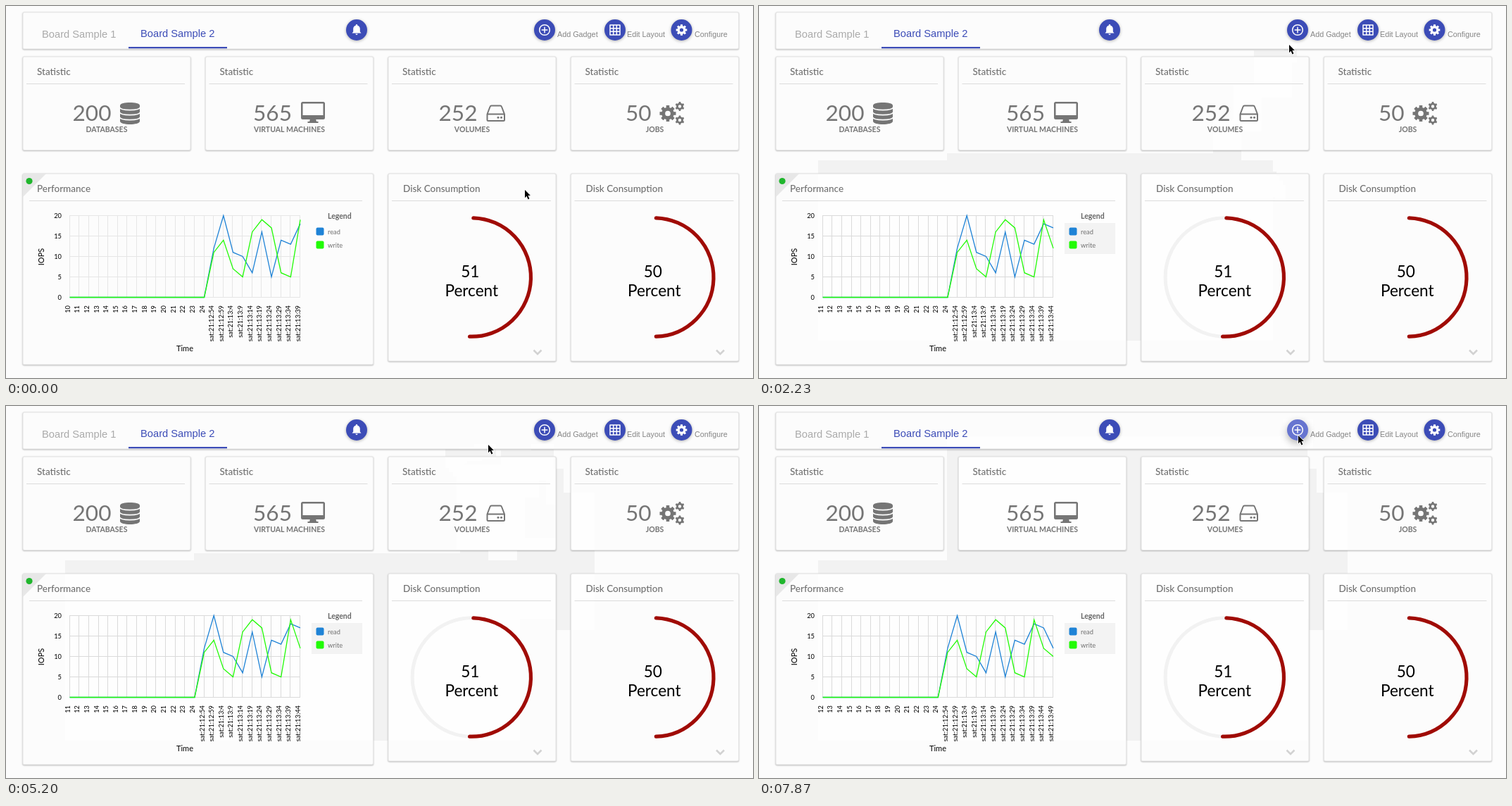
These frames come from a looping animation (1061 px wide and 528 px high, 8 s). An HTML page with a canvas:

```html
<!DOCTYPE html>
<html>
<head>
<meta charset="utf-8">
<style>
html, body { margin: 0; width: 100%; height: 100%; overflow: hidden; background: #fcfcfc; }
canvas { display: block; }
</style>
</head>
<body>
<canvas id="stage" width="1061" height="528"></canvas>
<script>
const ctx = document.getElementById('stage').getContext('2d');
const LOOP = 8000, TICK = 148.3;
const GREY = '#757575', INDIGO = '#3c4cb7', LATO = 'Lato, sans-serif', SANS = '"Liberation Sans", Arial, sans-serif';
const read = [12, 20, 11, 10, 6, 16, 5, 14, 13, 18, 17, 12];
const write = [11, 14, 7, 5, 16, 19, 17, 6, 5, 19, 12, 10];

// The chart shifts by one sample at each update
const updates = [{ tick: 6, start: 980 }, { tick: 41, start: 5940 }];
const HAND_FROM = 40, HAND_TO = 51;

// Pointer key points (tick, x, y), joined by straight moves
const keys = [
  [0, 737, 260], [4, 719, 235], [5, 719, 235], [6, 650, 219], [10, 645, 209], [12, 703, 113], [13, 703, 113],
  [14, 746, 63], [15, 753, 54], [17, 753, 54], [19, 781, 123], [20, 825, 301], [22, 810, 285], [23, 726, 187],
  [25, 726, 187], [26, 640, 83], [29, 624, 65], [32, 624, 65], [39, 766, 40], [40, 768, 46], [41, 768, 46],
  [42, 768, 43], [50, 768, 43], [51, 766, 41], [54, 766, 41]
];

function pointerAt(tick) {
  const i = Math.max(1, keys.findIndex(key => key[0] >= tick));
  const [t0, x0, y0] = keys[i - 1], [t1, x1, y1] = keys[i];
  const p = (tick - t0) / (t1 - t0);
  return [Math.round(x0 + (x1 - x0) * p), Math.round(y0 + (y1 - y0) * p)];
}

// The area repainted at a tick encloses everything that changed: left, top, right, bottom
function repaintAt(tick) {
  const boxes = [];
  const from = pointerAt(tick - 1), to = pointerAt(tick);
  if (String(from) !== String(to))
    for (const [x, y] of [from, to]) boxes.push([x, y, x + 11, y + 17]);
  for (const update of updates)
    if (tick >= update.tick && tick < update.tick + 5) boxes.push([tick === update.tick ? 84 : 267, 290, 506, 475]);
  if (tick >= HAND_TO) boxes.push([745, 19, 787, 60]);
  return boxes.length && boxes.reduce((a, b) => a.map((v, i) => i < 2 ? Math.min(v, b[i]) : Math.max(v, b[i])));
}

function text(str, x, y, size, color, { align = 'left', weight = 400, family = LATO, turn = false } = {}) {
  ctx.save();
  ctx.translate(x, y);
  if (turn) ctx.rotate(-Math.PI / 2);
  ctx.font = `${weight} ${size}px ${family}`;
  ctx.textAlign = align;
  ctx.fillStyle = color;
  ctx.fillText(str, 0, 0);
  ctx.restore();
}

function rect(x, y, w, h, color, radius = 0) {
  ctx.fillStyle = color;
  ctx.beginPath();
  ctx.roundRect(x, y, w, h, radius);
  ctx.fill();
}

function disc(x, y, r, color) {
  ctx.fillStyle = color;
  ctx.beginPath();
  ctx.arc(x, y, r, 0, 7);
  ctx.fill();
}

function arc(x, y, r, from, to, color, width) {
  ctx.strokeStyle = color;
  ctx.lineWidth = width;
  ctx.beginPath();
  ctx.arc(x, y, r, from, to);
  ctx.stroke();
}

function line(points, color, width = 1) {
  ctx.strokeStyle = color;
  ctx.lineWidth = width;
  ctx.beginPath();
  points.forEach(([x, y]) => ctx.lineTo(x, y));
  ctx.stroke();
}

function shape(d, x, y, fill, stroke, width = 1) {
  const path = new Path2D(d);
  ctx.save();
  ctx.translate(x, y);
  ctx.lineJoin = ctx.lineCap = 'round';
  if (stroke) { ctx.strokeStyle = stroke; ctx.lineWidth = width; ctx.stroke(path); }
  if (fill) { ctx.fillStyle = fill; ctx.fill(path); }
  ctx.restore();
}

function shadowed(blur, offset, alpha, draw) {
  ctx.save();
  ctx.shadowColor = `rgba(0,0,0,${alpha})`;
  ctx.shadowBlur = blur;
  ctx.shadowOffsetY = offset;
  draw();
  ctx.restore();
}

function card(x, y, w, h, fresh) {
  shadowed(2, .8, .3, () => rect(x - .5, y - .5, w + 1, h + 1, '#e6e6e6', 2));
  rect(x + .5, y + .5, w - 1, h - 1, fresh ? '#fefefe' : '#fcfcfc', 2);
}

function cardTitle(title, x, y, lineFrom, lineTo) {
  text(title, x, y, 13.5, '#707070', { weight: 500 });
  line([[lineFrom, y + 12.5], [lineTo, y + 12.5]], '#dcdcdc');
}

function gear(x, y, r, teeth, color) {
  ctx.save();
  ctx.translate(x, y);
  for (let i = 0; i < teeth; i++) {
    rect(-r * .2, -r, r * .4, r * .5, color);
    ctx.rotate(2 * Math.PI / teeth);
  }
  ctx.restore();
  arc(x, y, r * .55, 0, 7, color, r * .43);
}

const icons = {
  database() {
    shape('M162 141v22.5c0 6 28 6 28 0V141c0-5.5-28-5.5-28 0z', 0, 0, GREY);
    for (const y of [143.5, 150.5, 157.5]) shape('M161 0c2 5.5 28 5.5 30 0', 0, y, null, '#fcfcfc', 1.7);
  },
  monitor() {
    rect(419, 136, 34, 25, GREY, 2.5);
    rect(421.5, 138.5, 29, 16.5, '#fcfcfc');
    shape('M432 160h8l1 4h2.5v2h-15v-2h2.5z', 0, 0, GREY);
  },
  drive() {
    shape('M683.5 153.5l4-10.5q.5-1.5 2-1.5h12.5q1.500 0 2 1.5l4 10.5v8q0 1.5-1.5 1.5h-21.5q-1.5 0-1.5-1.5zh24.5', 0, 0, null, GREY, 2);
    for (const x of [699, 703.5]) disc(x, 158.3, 1.5, GREY);
  },
  cogs() {
    gear(940, 152.5, 11.5, 8, GREY);
    for (const y of [142.5, 162]) gear(957, y, 6.5, 6, GREY);
  }
};

function statistic(x, value, valueX, label, icon, fresh) {
  card(x, 72, 238, 132.5, fresh);
  cardTitle('Statistic', x + 20, 98, x + 5, x + 230);
  text(value, valueX, 163, 31.6, GREY);
  text(label, x + 119, 179, 10.5, GREY, { align: 'center', weight: 700 });
  icons[icon]();
}

function gauge(x, percent, fresh) {
  const cx = x + 118.3, top = -Math.PI / 2;
  card(x, 238, 238, 266, fresh);
  cardTitle('Disk Consumption', x + 21, 264, x + 5, x + 231);
  if (fresh) arc(cx, 385, 84.2, 0, 7, '#f2f2f2', 5);
  ctx.lineCap = 'round';
  arc(cx, 385, 84.2, top + .03, top + percent / 50 * Math.PI - .03, '#a00b05', 5.2);
  ctx.lineCap = 'butt';
  text(percent, cx - 2, 385, 22.6, '#000', { align: 'center' });
  text('Percent', cx, 412, 22.6, '#000', { align: 'center' });
  line([[x + 206.5, 488.5], [x + 212, 494], [x + 217.5, 488.5]], '#d2d2d2', 2.5);
}

function easeInOut(p) {
  p = Math.min(1, Math.max(0, p));
  return p < .5 ? 4 * p ** 3 : 1 - 4 * (1 - p) ** 3;
}

function chart(tick, fresh) {
  const done = updates.filter(update => update.tick <= tick), shift = done.length;
  const moved = shift ? easeInOut((tick * TICK - done[shift - 1].start) / 750) : 0;
  const px = i => 90.6 + i * 13.64, py = v => 413.5 - v * 5.8;
  const grid = fresh ? '#dadada' : '#e6e6e6';

  for (let v = 0; v <= 20; v += 5) {
    const y = Math.floor(py(v)) + .5;
    line([[90, y], [418, y]], grid);
    text(v, 79, y + 3.5, 9.3, '#000', { align: 'right' });
  }
  for (let i = 0; i < 25; i++) {
    const x = Math.round(px(i)) - .5, n = i + shift;
    line([[x, 297], [x, 414]], grid);
    const sec = 54 + (n - 15) * 5;
    const label = n < 15 ? n + 10 : `sat:21:${12 + Math.floor(sec / 60)}:${sec % 60}`;
    text(label, px(i), 425, 9.3, '#000', { align: 'right', turn: true });
  }
  [['read', '#1f83d6', read], ['write', '#21fb05', write]].forEach(([name, color, series], row) => {
    const at = n => series[n - 15] || 0;
    line(Array.from({ length: 25 }, (_, i) => {
      const next = at(i + shift), last = at(i + shift - 1);
      return [px(i), py(shift ? last + (next - last) * moved : next)];
    }), color, 1.3);
    const y = 314.5 + row * 19;
    if (fresh) rect(434, 308 + row * 22, 72, 22, '#f3f3f3');
    rect(440.5, y, 11, 11, color, 2);
    text(name, 457, y + 9.3, 9.3, '#707070');
  });
  text('Legend', 457, 302, 10.5, '#666', { weight: 700 });
  text('IOPS', 54, 356, 11, '#000', { align: 'center', turn: true });
  text('Time', 254, 490, 11, '#000', { align: 'center' });
}

function performancePanel(tick, fresh) {
  card(24, 238, 497.5, 271, fresh);
  shape('M24 238h33l-33 33z', 0, 0, '#e7e7e7');
  disc(33, 248.5, 4.6, '#20b62d');
  cardTitle('Performance', 44, 264, 33, 506);
  chart(tick, fresh);
}

function roundButton(x, glow = 0) {
  const mix = (a, b) => Math.round(a + (b - a) * glow);
  const color = `rgb(${mix(60, 103)},${mix(76, 117)},${mix(183, 208)})`;
  shadowed(4 + 7 * glow, 1 + 3 * glow, .3, () => disc(x, 34, 15, color));
}

function header(tick, fresh) {
  card(24, 9, 1016.5, 52, fresh);
  text('Board Sample 1', 51, 44.5, 14.7, '#aaa', { family: SANS });
  text('Board Sample 2', 191, 43.5, 14.7, INDIGO, { family: SANS });
  rect(174, 58, 140, 2.2, INDIGO);

  roundButton(498);
  shape('M-6.5 4.5l1.7-2v-4.5q.3-3.5 3.5-4.3v-.5a1.3 1.3 0 0 1 2.6 0v.5q3.2.8 3.5 4.3v4.5l1.7 2zM-1.6 5.5h3.2q-.2 1.6-1.6 1.6t-1.6-1.6z', 498, 34, '#fff');

  roundButton(765, Math.min(1, Math.max(0, (tick - HAND_TO + 1) / 3)));
  shape('M7.3 0a7.3 7.3 0 1 1-14.6 0a7.3 7.3 0 1 1 14.6 0M-3.8 0h7.6M0-3.8v7.6', 765, 34, null, '#fff', 1.5);

  roundButton(865);
  shape('M-7-7h14v14h-14zM-7-2.3h14M-7 2.3h14M-2.3-7v14M2.3-7v14', 865, 34, null, '#fff', 1.5);

  roundButton(959.5);
  gear(959.5, 34, 7.8, 8, '#fff');

  [['Add Gadget', 783], ['Edit Layout', 882], ['Configure', 978]]
    .forEach(([label, x]) => text(label, x, 43.5, 10.8, '#858585', { family: SANS }));
}

function dashboard(tick, fresh) {
  rect(0, 0, 1061, 528, fresh ? '#f2f2f2' : '#fcfcfc');
  header(tick, fresh);
  statistic(24, '200', 94.5, 'DATABASES', 'database', fresh);
  statistic(283.5, '565', 351, 'VIRTUAL MACHINES', 'monitor', fresh);
  statistic(543, '252', 614.5, 'VOLUMES', 'drive', fresh);
  statistic(802.5, '50', 880, 'JOBS', 'cogs', fresh);
  performancePanel(tick, fresh);
  gauge(543, 51, fresh);
  gauge(802.5, 50, fresh);
}

function pointer(tick) {
  const [x, y] = pointerAt(tick);
  if (tick >= HAND_FROM && tick < HAND_TO)
    shape('M-3.5 7.5V1.2q0-1.2 1.1-1.2T-1.3 1.2V5q1.2-.8 2 .2q1.3-.6 2 .4q2-.2 2 1.6v2.3q0 2-1.2 3.2v1.3h-5.5v-1.2q-1.5-1.5-3.7-4.3q-.3-1.3 1-1.2z', x, y, '#fff', '#000', 2);
  else
    shape('M0 0v11.2l2.5-2.4 2 4.6 1.9-.8-2-4.5h3.5z', x, y + 1, '#000', '#fff', 1.5);
}

function render(now) {
  const tick = Math.floor((now % LOOP + 6) / TICK);
  dashboard(tick, false);
  ctx.save();
  ctx.beginPath();
  for (let t = 1; t <= tick; t++) {
    const box = repaintAt(t);
    if (box) ctx.rect(box[0], box[1], box[2] - box[0], box[3] - box[1]);
  }
  ctx.clip();
  dashboard(tick, true);
  ctx.restore();
  pointer(tick);
}

const begin = performance.now();
function loop() {
  render(performance.now() - begin);
  requestAnimationFrame(loop);
}
loop();
</script>
</body>
</html>
```
